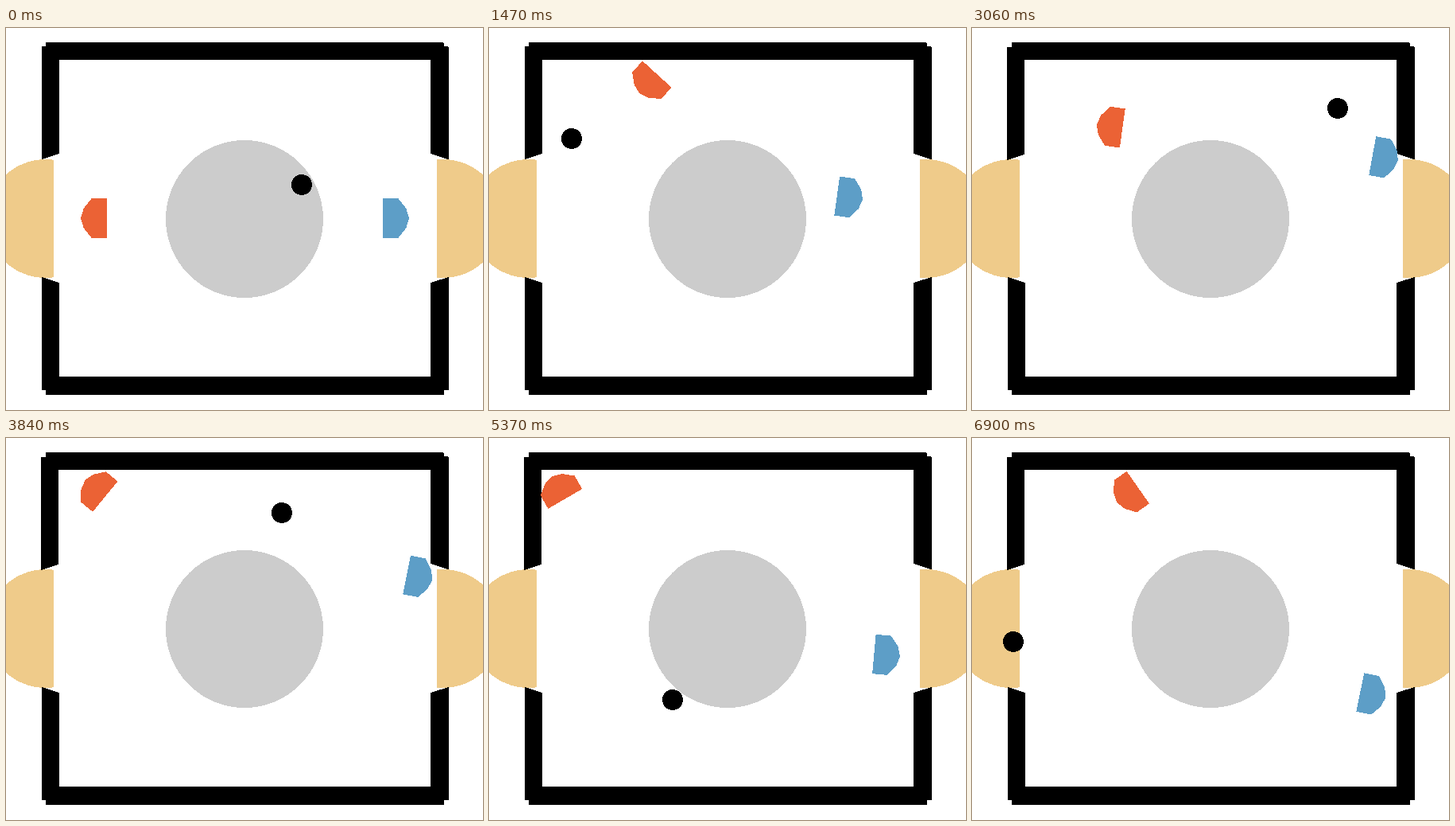
Animation of 600x480 px, one loop 6.93 s. Source, as an HTML page:

```html
<!DOCTYPE html>
<html lang="en">
<head>
<meta charset="utf-8">
<title>Table hockey</title>
<style>
  html, body { margin: 0; width: 100%; height: 100%; overflow: hidden; background: #fff; }
  svg { display: block; width: 600px; height: 480px; shape-rendering: crispEdges; }
  .racket { stroke-width: 1.5; }
</style>
</head>
<body>
<svg viewBox="0 0 600 480">
  <circle cx="300" cy="240" r="99" fill="#ccc"/>
  <g fill="#efcb8a">
    <path d="M60 165.7A74.5 74.5 0 1 0 60 313.3Z"/>
    <path d="M542 165.4A74.5 74.5 0 1 1 542 313.6Z"/>
  </g>
  <path d="M50 18H549L551 20V40H50ZM50 438H551V461H50Z"/>
  <path d="M45 313L67 320V455H45Z"/>
  <path d="M534 23H555L557 25V165.4L534 158ZM557 313L534 320V455H557Z"/>
  <path id="post" d="M45 23H67V158L45 165.3Z"/>
  <path id="red" class="racket" fill="#eb6235" stroke="#eb6235"
    d="M-12 24H6V-24H-12L-21.6 -12L-25.2 0L-21.6 12Z"/>
  <path id="blue" class="racket" fill="#5d9ec7" stroke="#5d9ec7"
    d="M12 24H-6V-24H12L21.6 -12L25.2 0L21.6 12Z"/>
  <circle id="puck" r="13"/>
</svg>
<script>
const LOOP = 6930, STEP = 30, POST_SHIFT = 2550;
const FIRST_CATCH = 940, FIRST_SHOT = 1166, LAST_CATCH = 6270, LAST_SHOT = 6440;
const START = [372, 197], GOAL = [52, 256];
const LEFT = 80, RIGHT = 521, TOP = 53, BOTTOM = 425;

// Turning points of each racket: time, x, y, angle
const redPath = [
  [0, 120, 239, 0], [1470, 206.8, 63.1, -47.6], [2100, 178, 62.3, -49.2],
  [3060, 182.6, 125, 8], [3420, 205, 66, 22], [4000, 100, 72, 45],
  [4680, 202.2, 135.8, 62], [5300, 92, 70, 60], [6120, 130, 97.4, 59.8],
  [6900, 203.3, 66, -35]
];
const bluePath = [
  [0, 481, 239, 0], [330, 503, 229, 0], [1100, 390, 212, 13], [1470, 444.4, 212, 8],
  [2100, 506.5, 175.3, -5.7], [2550, 509, 190, 3], [3060, 510.4, 161.8, 10.4],
  [4680, 510.9, 202.9, 11.5], [5400, 491, 275, 5], [6120, 501, 338, 0],
  [6300, 474, 342, 6], [6900, 494.9, 320.9, 11.5]
];
// Free run of the puck on a table without walls; fold() adds the bounces.
const puckPath = [
  [FIRST_SHOT, ...smooth(bluePath, FIRST_SHOT)], [1470, 104, 139], [2100, -438, 51],
  [2400, -677, 32], [3060, -422, 5], [4350, -33, 16], [4680, 55, -62], [6120, 422, -397],
  [LAST_CATCH, 457, -428]
];
const lastShot = [
  [LAST_SHOT, ...smooth(bluePath, LAST_SHOT)], [LOOP - STEP, ...GOAL]
];

function segment(keys, t) {
  let i = 0;
  while (i < keys.length - 2 && keys[i + 1][0] <= t) i++;
  const span = keys[i + 1][0] - keys[i][0];
  return { i, span, u: Math.min(1, (t - keys[i][0]) / span) };
}

function linear(keys, t) {
  const { i, u } = segment(keys, t);
  return [1, 2].map(k => keys[i][k] + (keys[i + 1][k] - keys[i][k]) * u);
}

function slope(keys, i, k) {
  const a = keys[i - 1], b = keys[i], c = keys[i + 1];
  if (!a || !c) return 0;
  const before = (b[k] - a[k]) / (b[0] - a[0]);
  const after = (c[k] - b[k]) / (c[0] - b[0]);
  return before * after <= 0 ? 0 : 2 * before * after / (before + after);
}

// Cubic easing that never swings past a turning point
function smooth(keys, t) {
  const { i, span, u } = segment(keys, t);
  const v = 1 - u;
  return [1, 2, 3].map(k =>
    keys[i][k] * (1 + 2 * u) * v * v + keys[i + 1][k] * u * u * (3 - 2 * u) +
    span * (slope(keys, i, k) * u * v * v - slope(keys, i + 1, k) * u * u * v));
}

function fold(value, low, high) {
  const size = high - low, period = 2 * size;
  const d = ((value - low) % period + period) % period;
  return low + Math.min(d, period - d);
}

function puckAt(t, carrier) {
  if (t < FIRST_CATCH) return START;
  if (t < FIRST_SHOT) return carrier;
  if (t >= LAST_SHOT) return linear(lastShot, t);
  if (t >= LAST_CATCH) return carrier;
  const [x, y] = linear(puckPath, t);
  return [fold(x, LEFT, RIGHT), fold(y, TOP, BOTTOM)];
}

const [post, red, blue, puck] = ["post", "red", "blue", "puck"]
  .map(id => document.getElementById(id));

function place(node, [x, y, angle = 0]) {
  node.setAttribute("transform", `translate(${x} ${y}) rotate(${angle})`);
}

function draw(t) {
  const bluePose = smooth(bluePath, t);
  place(red, smooth(redPath, t));
  place(blue, bluePose);
  place(puck, puckAt(t, bluePose).slice(0, 2).map(Math.round));
  place(post, t < POST_SHIFT ? [0, 0] : [-1, 1]);
}

let start;
function tick(now) {
  start ??= now;
  const t = (now - start) % LOOP;
  draw(Math.floor(t / STEP) * STEP);
  requestAnimationFrame(tick);
}
draw(0);
requestAnimationFrame(tick);
</script>
</body>
</html>
```
